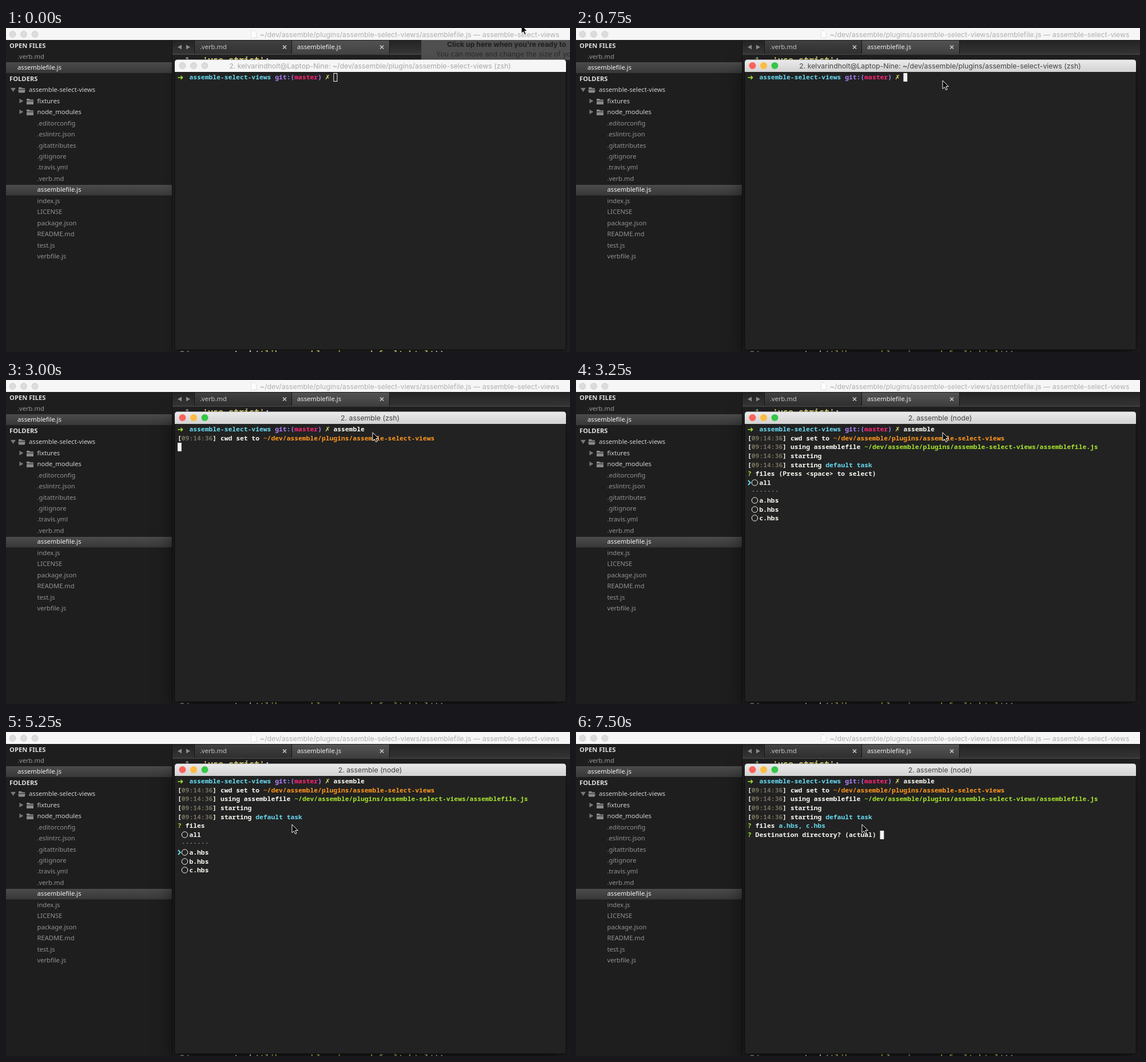
Recreate the animation shown at these times as an HTML page. Size 986 by 568 pixels, loop 8 s.

```html
<!DOCTYPE html>
<html lang="en">
<head>
<meta charset="utf-8">
<title>Terminal session</title>
<style>
  html, body { margin: 0; width: 100%; height: 100%; overflow: hidden; background: #1e1e1e; }
  svg { display: block; }
  text { white-space: pre; }
  .ui { font: 12.3px Inter, "Liberation Sans", sans-serif; }
  .side { font: 11.2px "Noto Sans", "Open Sans", sans-serif; }
  .mono { font: 600 11.35px "Noto Sans Mono", "DejaVu Sans Mono", monospace; }
  .code { font: 600 15px "Noto Sans Mono", "DejaVu Sans Mono", monospace; }
  .sign { font: 13px "DejaVu Sans", sans-serif; }
  .bold { font-weight: 700; }
  .mid { text-anchor: middle; }
  #window { filter: drop-shadow(0 5px 7px rgba(0, 0, 0, .4)); }
  #window.active { filter: drop-shadow(0 14px 18px rgba(0, 0, 0, .65)); }
</style>
</head>
<body>
<svg width="986" height="568" viewBox="0 0 986 568">
  <defs>
    <linearGradient id="selected" x2="0" y2="1"><stop stop-color="#4b4b4b"/><stop offset="1" stop-color="#383838"/></linearGradient>
    <linearGradient id="tabs" x2="0" y2="1"><stop stop-color="#232323"/><stop offset="1" stop-color="#363636"/></linearGradient>
    <linearGradient id="tab" x2="0" y2="1"><stop stop-color="#404040"/><stop offset="1" stop-color="#323232"/></linearGradient>
    <linearGradient id="openTab" x2="0" y2="1"><stop stop-color="#525252"/><stop offset="1" stop-color="#424242"/></linearGradient>
    <linearGradient id="bar" x2="0" y2="1"><stop stop-color="#ebebeb"/><stop offset="1" stop-color="#d2d2d2"/></linearGradient>
  </defs>
  <g id="editor"></g>
  <g id="hint"></g>
  <g id="window">
    <path d="M295 564V61q0-5 5-5H974q5 0 5 5V564z" fill="#222" stroke="#000" stroke-opacity=".5"/>
    <path id="titlebar" d="M295 77V60.5q0-5 5-5H974q5 0 5 5V77z"/>
    <g id="lights"></g>
    <text id="title" class="ui mid" x="636.5" y="71"></text>
  </g>
  <g id="terminal"></g>
  <path id="pointer" d="M0 0V14.6L3.4 11.5 5.6 16.6 8 15.6 5.8 10.5H10.2Z" stroke="#fff" stroke-linejoin="round"/>
</svg>
<script>
const $ = id => document.getElementById(id);
const LOOP = 8000;
const WHITE = '#f8f8f2', GREEN = '#a6e22e', CYAN = '#66d9ef', PURPLE = '#ae81ff',
      PINK = '#f92672', YELLOW = '#e6db74', ORANGE = '#fd971f', GREY = '#75715e';

const text = (x, y, str, fill, cls) => `<text x="${x}" y="${y}" fill="${fill}" class="${cls}">${str}</text>`;
const rect = (x, y, w, h, fill) => `<rect x="${x}" y="${y}" width="${w}" height="${h}" fill="${fill}"/>`;
const path = (d, fill, extra = '') => `<path d="${d}" fill="${fill}" ${extra}/>`;
const circle = (x, y, r, fill, stroke = 'none') =>
  `<circle cx="${x}" cy="${y}" r="${r}" fill="${fill}" stroke="${stroke}"/>`;
const lights = (x, y, r, colors, stroke) =>
  colors.map((c, i) => circle(x + 19.5 * i, y, r, c, stroke)).join('');

// Editor window

function sidebar() {
  const rowY = i => Math.floor(35 + 19.45 * i);
  const folder = (x, y) => path(`M${x} ${y - 8}h5l1 1.5h6v2h-12zM${x} ${y - 3.5}h12v5.5h-12z`, '#8a8a8a');
  const files = ['.editorconfig', '.eslintrc.json', '.gitattributes', '.gitignore', '.travis.yml', '.verb.md',
    'assemblefile.js', 'index.js', 'LICENSE', 'package.json', 'README.md', 'test.js', 'verbfile.js'];
  let out = rect(0, 21, 290, 547, '#1e1e1e') + rect(290, 21, 1, 547, '#111')
    + rect(0, 60, 290, 19, 'url(#selected)') + rect(0, 275, 290, 18.5, 'url(#selected)')
    + text(6, rowY(0), 'OPEN FILES', '#ddd', 'side bold')
    + text(20, rowY(1), '.verb.md', '#999', 'side')
    + text(20, rowY(2), 'assemblefile.js', '#f2f2f2', 'side')
    + text(6, rowY(3), 'FOLDERS', '#ddd', 'side bold')
    + path('M8 105h9l-4.5 7z', '#777') + path('M22 104h5l1 1.5h5v2h-11zM21 108.5h13l-1.5 5h-10z', '#8a8a8a')
    + text(40, rowY(4), 'assemble-select-views', '#d0d0d0', 'side');
  ['fixtures', 'node_modules'].forEach((name, i) => {
    const y = rowY(5 + i);
    out += path(`M23.5 ${y - 8}l7 4-7 4z`, '#777') + folder(36, y) + text(54.5, y, name, '#d0d0d0', 'side');
  });
  files.forEach((name, i) => {
    out += text(54.5, rowY(7 + i), name, i === 6 ? '#f2f2f2' : '#929292', 'side');
  });
  return out;
}

function tabBar() {
  const close = x => path(`M${x - 3} 30.5l6 6m0-6l-6 6`, 'none', 'stroke="#c8c8c8" stroke-width="1.7"');
  return rect(291, 21, 695, 25, 'url(#tabs)')
    + rect(330, 22, 169, 23, 'url(#tab)') + rect(500, 22, 170, 24, 'url(#openTab)')
    + rect(329, 22, 1, 23, '#151515') + rect(499, 22, 1, 23, '#151515') + rect(670, 22, 1, 23, '#151515')
    + rect(291, 45, 695, 2, '#424242')
    + path('M307 29.5v8l-7-4zM315 29.5v8l7-4z', '#8c8c8c')
    + text(339, 37, '.verb.md', '#c4c4c4', 'side') + close(487)
    + text(509, 37, 'assemblefile.js', '#f0f0f0', 'side') + close(657);
}

function codeLines() {
  const code = (col, y, str, fill) => text(344 + 9 * col, y, str, fill, 'code');
  return code(-3.5, 61, '1', '#8f908a') + code(0, 61, "'use strict'", YELLOW) + code(12, 61, ';', WHITE)
    + code(-4.5, 576, '24', '#8f908a') + code(2, 576, 'app.task(', WHITE)
    + code(11, 576, "'lib.assemble views, default html'", YELLOW) + code(45, 576, '))', WHITE);
}

$('editor').innerHTML = rect(291, 46, 695, 522, '#212121') + codeLines() + sidebar() + tabBar()
  + rect(0, 0, 986, 21, '#f6f6f6') + rect(0, 21, 986, 1, '#161616')
  + lights(11.5, 11, 5.5, ['#dcdcdc', '#dcdcdc', '#dcdcdc'], '#d0d0d0')
  + path('M428.5 4.5h6l3 3v10h-9z', '#fdfdfd', 'stroke="#e0e0e0"')
  + text(444, 15.5, '~/dev/assemble/plugins/assemble-select-views/assemblefile.js — assemble-select-views', '#b0b0b0', 'ui');

$('hint').innerHTML = rect(726, 21, 260, 35, '#4f4f4f')
  + text(771, 33, "Click up here when you're ready to", '#1f1f1f', 'ui bold')
  + text(752, 50, 'You can move and change the size of your', '#2c2c2c', 'ui');

// Terminal contents on a character grid, with rows snapped to whole pixels

const CELL = 6.81;
const colX = col => 300 + CELL * col;
const baseline = row => Math.round(90.2 + 15.6 * row);
const put = (col, row, str, fill = WHITE, bold = false) =>
  text(colX(col), baseline(row), str, fill, bold ? 'mono bold' : 'mono');
const block = (col, row) => rect(colX(col), baseline(row) - 11, CELL, 15, '#f4f4f4');
const log = (row, str) => put(0, row, '[') + put(1, row, '09:14:36', GREY) + put(9, row, ']') + put(11, row, str);
const question = (row, str) => put(0, row, '?', GREEN, true) + put(2, row, str, WHITE, true);

const prompt = text(299.5, 91, '➜', GREEN, 'sign')
  + put(3, 0, 'assemble-select-views', CYAN, true) + put(25, 0, 'git:(', PURPLE, true)
  + put(30, 0, 'master', PINK, true) + put(36, 0, ')', PURPLE, true)
  + `<text x="557.5" y="90" fill="${YELLOW}" class="sign" style="font-size:11px">✗</text>`;
const cwdLine = log(1, 'cwd set to') + put(22, 1, '~/dev/assemble/plugins/assemble-select-views', ORANGE);
const startLines = log(2, 'using assemblefile')
  + put(30, 2, '~/dev/assemble/plugins/assemble-select-views/assemblefile.js', GREEN)
  + log(3, 'starting') + log(4, 'starting') + put(20, 4, 'default task', CYAN);

function choice(row, label, checked, current) {
  const y = baseline(row) - 4;
  return (current ? path(`M301 ${y - 4}l3.8 4-3.8 4`, 'none', `stroke="${CYAN}" stroke-width="2"`) : '')
    + circle(312.5, y, 5.2, 'none', checked ? GREEN : WHITE)
    + (checked ? circle(312.5, y, 3.6, GREEN) : '')
    + put(3, row, label);
}

function menu(t) {
  const current = t < 5250 ? 6 : t < 6500 ? 8 : 10;
  return question(5, 'files') + (t < 5250 ? put(8, 5, '(Press &lt;space> to select)') : '')
    + choice(6, 'all', false, current === 6) + put(1, 7, '·······', '#858170')
    + choice(8, 'a.hbs', t >= 6000, current === 8)
    + choice(9, 'b.hbs', false, false)
    + choice(10, 'c.hbs', t >= 7000, current === 10);
}

function terminal(t) {
  if (t < 750) return prompt + `<rect x="572.9" y="79.5" width="6" height="14" fill="none" stroke="${WHITE}"/>`;
  const typed = t < 1750 ? 0 : t < 2000 ? 2 : t < 2250 ? 4 : t < 2500 ? 7 : 8;
  let out = prompt + put(40, 0, 'assemble'.slice(0, typed));
  if (t < 2750) return out + block(40 + typed, 0);
  if (t < 3000) return out + block(0, 1);
  out += cwdLine;
  if (t < 3250) return out + block(0, 2);
  out += startLines;
  if (t < 7500) return out + menu(t);
  return out + question(5, 'files') + put(8, 5, 'a.hbs, c.hbs', CYAN)
    + question(6, 'Destination directory?') + put(25, 6, '(actual)') + block(34, 6);
}

const pointerStops = [[0, 901, -5], [250, 725, 62], [500, 659, 84], [750, 641, 92], [4500, 607, 96], [4750, 500, 162]];
const changes = [0, 250, 500, 750, 1750, 2000, 2250, 2500, 2750, 3000, 3250, 4500, 4750, 5250, 6000, 6500, 7000, 7500];
let shown = -1;

function draw(t) {
  const active = t >= 750;
  $('hint').style.display = t < 250 ? '' : 'none';
  $('window').setAttribute('class', active ? 'active' : '');
  $('titlebar').setAttribute('fill', active ? 'url(#bar)' : '#f6f6f6');
  $('lights').innerHTML = active
    ? lights(308.5, 66, 6, ['#fc615d', '#fdbc40', '#34c749'])
    : lights(308.5, 66, 5.5, ['#dcdcdc', '#dcdcdc', '#dcdcdc'], '#d0d0d0');
  $('title').setAttribute('fill', active ? '#444' : '#a8a8a8');
  $('title').textContent = '2. ' + (t < 3000
    ? 'kelvarindholt@Laptop-Nine: ~/dev/assemble/plugins/assemble-select-views (zsh)'
    : t < 3250 ? 'assemble (zsh)' : 'assemble (node)');
  $('terminal').innerHTML = terminal(t);
  const [, x, y] = pointerStops.findLast(stop => stop[0] <= t);
  $('pointer').setAttribute('transform', `translate(${x} ${y})`);
}

function tick() {
  const now = performance.now() % LOOP;
  const t = changes.findLast(time => time <= now);
  if (t !== shown) draw(shown = t);
  requestAnimationFrame(tick);
}
tick();
</script>
</body>
</html>
```
